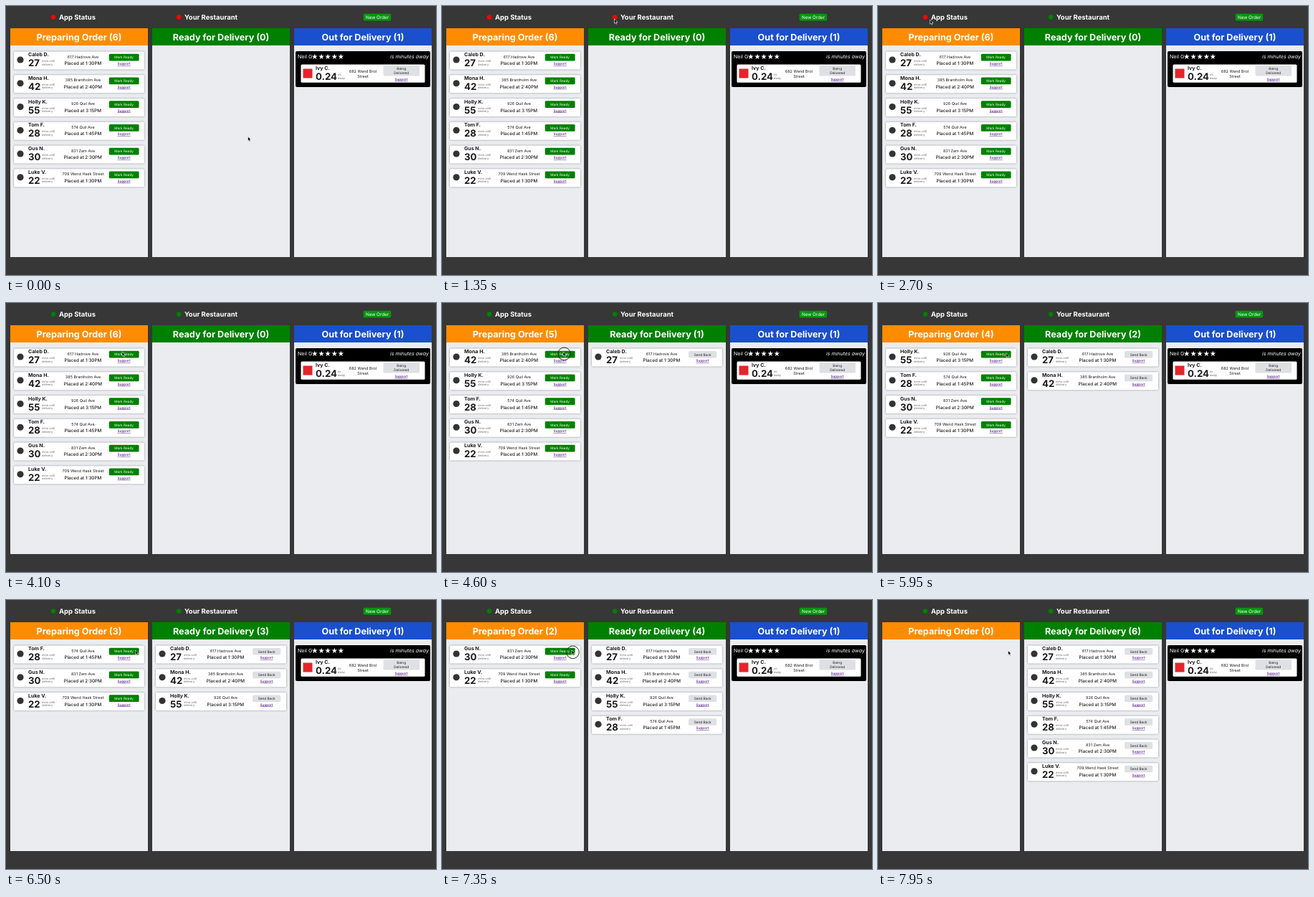
An HTML page for the animation above (8000 ms loop, 600 by 375 pixels).

```html
<!DOCTYPE html>
<html lang="en">
<head>
<meta charset="utf-8">
<title>Order board</title>
<style>
  html, body { margin: 0; width: 100%; height: 100%; overflow: hidden; background: #373737; }
  svg { display: block; width: 600px; height: 375px; }
  text { font-family: Inter, sans-serif; text-rendering: geometricPrecision; white-space: pre; }
  .card { fill: #fff; filter: drop-shadow(0 .8px 1px rgba(0, 0, 0, .42)); }
</style>
</head>
<body>
<svg id="stage" viewBox="0 0 600 375"></svg>
<script>
const LOOP = 8000;
const PITCH = 32.75, COLUMN_STEP = 198;
const GREEN = '#008000', INK = '#1c1c1e', GREY = '#dfe0e4', LINK = '#551a8b';

const orders = [
  ['Caleb D.', 27, '617 Hadrove Ave', '1:30'],
  ['Mona H.', 42, '385 Brantholm Ave', '2:40'],
  ['Holly K.', 55, '926 Quil Ave', '3:15'],
  ['Tom F.', 28, '574 Quil Ave', '1:45'],
  ['Gus N.', 30, '831 Zem Ave', '2:30'],
  ['Luke V.', 22, '709 Wend Hask Street', '1:30']
];

// Click times: the two status dots, then one per order
const RESTAURANT_ON = 1500, APP_ON = 2900;
const readyClicks = [4600, 5450, 6200, 6900, 7450, 7800];
const clicks = [RESTAURANT_ON, APP_ON, ...readyClicks];

// Cursor tip: time, x, y
const path = [
  [0, 337.5, 182], [150, 337.5, 182], [1150, 240.5, 18], [1700, 240.5, 18],
  [2600, 72.5, 19], [3150, 72.5, 19], [3950, 162, 67.5], [4100, 162, 68],
  [4500, 169, 68], [5450, 169, 68], [6100, 180.5, 70], [7400, 181, 70], [LOOP, 181.5, 70.5]
];

const text = (x, y, size, content, { fill = INK, weight = 400, anchor = 'start', more = '' } = {}) =>
  `<text x="${x}" y="${y}" font-size="${size}" font-weight="${weight}" fill="${fill}" text-anchor="${anchor}" ${more}>${content}</text>`;
const middle = (x, y, size, content, style = {}) => text(x, y, size, content, { ...style, anchor: 'middle' });
const rect = (x, y, w, h, fill, r = 0, more = '') =>
  `<rect x="${x}" y="${y}" width="${w}" height="${h}" rx="${r}" fill="${fill}" ${more}/>`;
const support = (x, y) => middle(x, y, 4.73, 'Support', { fill: LINK, weight: 500, more: 'text-decoration="underline"' });

function column(index, color) {
  const x = 6 + index * COLUMN_STEP;
  return rect(x, 31, 192, 319, '#ebecf0') + rect(x, 31, 192, 24, color) +
    middle(x + 96, 48, 12.6, '', { fill: '#fff', weight: 700, more: `id="title${index}"` });
}

function orderCard([name, minutes, address, time], ready, row) {
  const shift = ready ? 1 : 0;
  const button = ready
    ? rect(146, 67, 39.2, 9.6, GREY, 1.5) + middle(165.6, 73.6, 4.73, 'Send Back')
    : rect(143.8, 66.8, 41.8, 9.7, GREEN, 1.5) + middle(164.7, 73.4, 4.73, 'Mark Ready', { fill: '#fff' });
  return `<g transform="translate(${ready * COLUMN_STEP} ${row * PITCH})">` +
    rect(11, 63.5, 182, 25, '#fff', 1.5, 'class="card"') +
    '<circle cx="20" cy="75" r="4.6" fill="#333"/>' +
    text(31, 70, 7.09, name, { weight: 700 }) +
    text(31, 84.2, 13.2, minutes, { weight: 700 }) +
    text(50, 78.2, 4.05, 'mins until', { fill: '#6c6c70' }) +
    text(50, 82.7, 4.05, 'delivery', { fill: '#6c6c70' }) +
    middle(107.5 + shift, 72.6, 5.51, address) +
    middle(107.3 + shift, 82.2, 6.3, `Placed at ${time}PM`, { weight: 500 }) +
    button + support(164.6 + shift, 82) + '</g>';
}

function courierPanel() {
  return rect(404, 63, 188, 50, '#000', 2) +
    text(407, 72.6, 7.09, 'Neil G.', { fill: '#fff' }) +
    text(426.3, 73.8, 10.2, '★★★★★', { fill: '#fff', more: 'style="font-family:\'DejaVu Sans\',sans-serif"' }) +
    text(590, 72.6, 7.09, 'is minutes away', { fill: '#fff', anchor: 'end', more: 'font-style="italic"' }) +
    rect(411.5, 81.5, 173, 25.2, '#fff', 1.5) +
    rect(414.5, 87.5, 13, 13, '#e3262c') +
    text(432, 89, 7.09, 'Ivy C.', { weight: 700 }) +
    text(432, 103, 13.2, '0.24', { weight: 700 }) +
    text(463, 97.2, 4.05, 'mi', { fill: '#6c6c70' }) +
    text(463, 101.7, 4.05, 'away', { fill: '#6c6c70' }) +
    middle(498, 93.2, 5.51, '682 Wend Brol') + middle(498, 99.8, 5.51, 'Street') +
    rect(526.5, 83, 50.5, 14.6, GREY, 1.5) +
    middle(551.7, 89.2, 4.73, 'Being') + middle(551.7, 94.9, 4.73, 'Delivered') +
    support(551.5, 103.8);
}

const white = { fill: '#fff', weight: 700 };
document.getElementById('stage').innerHTML =
  rect(0, 0, 600, 375, '#373737') +
  '<circle id="appDot" cx="66" cy="15.6" r="3.3"/>' + text(74, 19, 9.45, 'App Status', white) +
  '<circle id="restaurantDot" cx="241.2" cy="15.6" r="3.3"/>' + text(249, 19, 9.45, 'Your Restaurant', white) +
  rect(498.7, 10.8, 38.5, 9.8, '#05960d', 1.5) + middle(518, 18, 6.3, 'New Order', { fill: '#fff' }) +
  column(0, '#ff8c00') + column(1, GREEN) + column(2, '#1a50cd') +
  courierPanel() + '<g id="cards"></g>' +
  `<g id="cursor">
    <circle id="ring" cx="1.5" cy="2.8" r="8.8" fill="none" stroke="#111" stroke-width=".9"/>
    <path d="M0 0V6.2L1.5 4.9L2.5 7.2L3.6 6.7L2.6 4.5H4.5Z" fill="#000" stroke="#fff" stroke-width=".6"/>
  </g>`;

const el = id => document.getElementById(id);
el('title2').textContent = 'Out for Delivery (1)';

let shownReady = -1;
function showOrders(ready) {
  if (ready === shownReady) return;
  shownReady = ready;
  el('title0').textContent = `Preparing Order (${orders.length - ready})`;
  el('title1').textContent = `Ready for Delivery (${ready})`;
  el('cards').innerHTML = orders.map((order, i) =>
    i < ready ? orderCard(order, 1, i) : orderCard(order, 0, i - ready)).join('');
}

function cursorAt(t) {
  const next = path.findIndex(key => key[0] > t);
  const [t0, x0, y0] = path[next - 1], [t1, x1, y1] = path[next];
  const u = (t - t0) / (t1 - t0), eased = u * u * (3 - 2 * u);
  return [x0 + (x1 - x0) * eased, y0 + (y1 - y0) * eased];
}

function draw() {
  const t = performance.now() % LOOP;
  showOrders(readyClicks.filter(click => t >= click).length);
  el('appDot').setAttribute('fill', t < APP_ON ? '#f00' : GREEN);
  el('restaurantDot').setAttribute('fill', t < RESTAURANT_ON ? '#f00' : GREEN);
  el('cursor').setAttribute('transform', `translate(${cursorAt(t)})`);
  const pressed = clicks.some(click => t > click - 110 && t < click + 80);
  el('ring').setAttribute('visibility', pressed ? 'visible' : 'hidden');
  requestAnimationFrame(draw);
}
draw();
</script>
</body>
</html>
```
